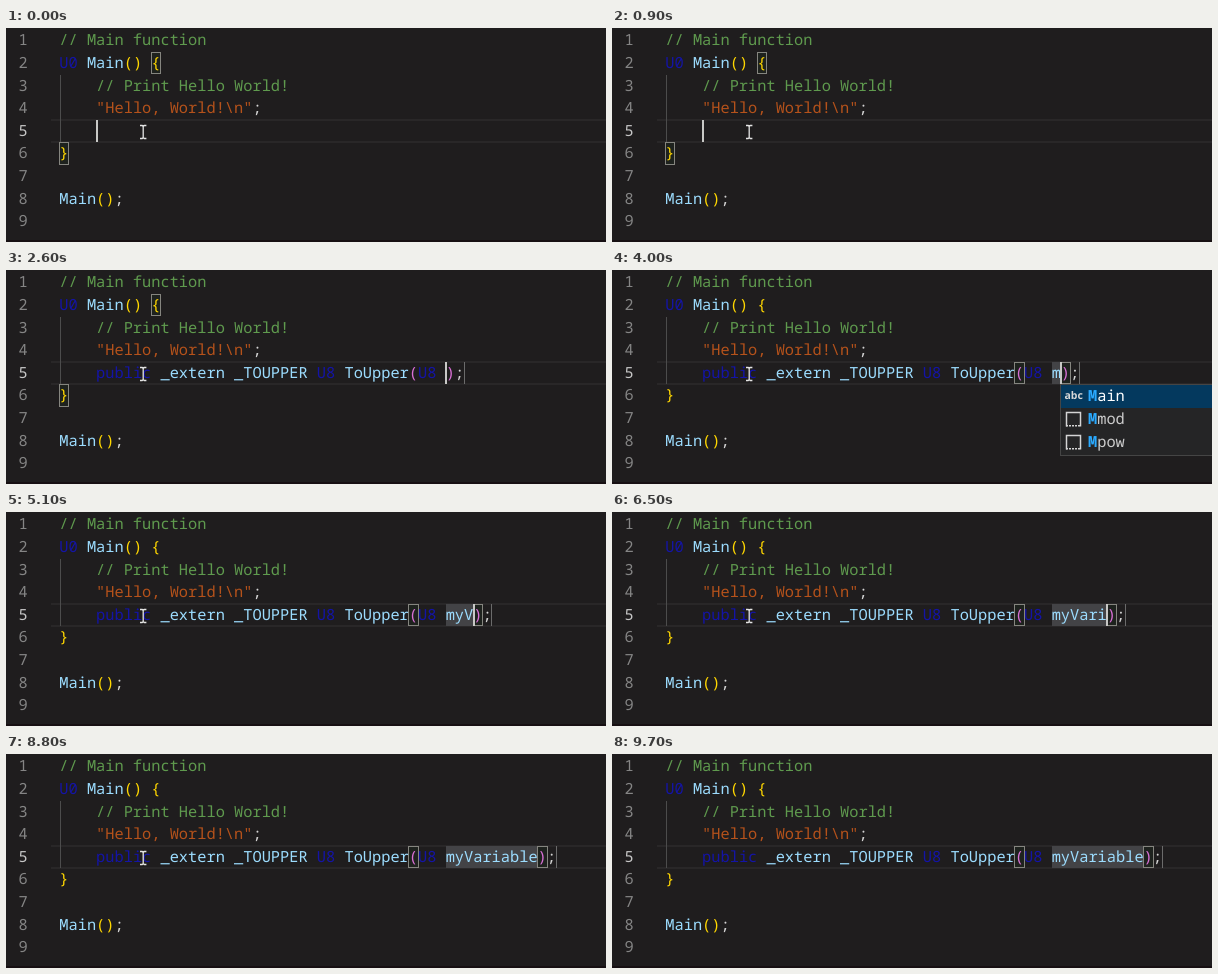
An HTML page for the animation above (9800 ms loop, 600 by 214 pixels).

```html
<!DOCTYPE html>
<html lang="en">
<head>
<meta charset="utf-8">
<title>Snippet completion</title>
<style>
html, body { margin: 0; width: 100%; height: 100%; overflow: hidden; background: #1f1d1e; }
#stage {
  position: relative; width: 600px; height: 214px; overflow: hidden;
  background: #1f1d1e; color: #d4d4d4;
  font: 500 15.333px "Noto Sans Mono", "DejaVu Sans Mono", monospace;
  text-rendering: geometricPrecision; font-variant-ligatures: none;
}
#stage div, #stage svg { position: absolute; white-space: pre; }
.line { line-height: 22.65px; height: 22.65px; }
.num { color: #858585; font-weight: 400; }
.num.on { color: #c6c6c6; }
.com { color: #5f9a4e; }
.str { color: #b5521b; }
.key { color: #1414a6; }
.id { color: #9cdcfe; }
.b1 { color: #ffd700; }
.b2 { color: #da70d6; }
.box { width: 8.5px; height: 20.5px; border: 1px solid #85857f; background: #1e221e; }
#current { left: 45px; top: 91px; width: 555px; height: 20px; border: 2px solid #292728; border-right: 0; border-left: 0; }
#guide { left: 54px; top: 47px; width: 1px; height: 67px; background: #4c4c4c; }
#word { top: 92px; height: 22px; background: #434346; }
#end { top: 92px; width: 1px; height: 22px; background: #6b6b6b; }
#caret { top: 92px; width: 2px; height: 22px; background: #c8c8c6; }
#mouse { left: 133px; top: 96px; }
#floor { left: 0; top: 212px; width: 600px; height: 2px; background: #171013; }
.menu { top: 114px; width: 520px; background: #252526; border: 1px solid #454545; }
.row { left: 0; width: 520px; height: 22.8px; line-height: 23.4px; color: #cccccc; }
.row.sel { background: #04395e; color: #ffffff; }
.row b { color: #2aaaff; font-weight: 700; }
.row .label { left: 26.6px; }
.row .note { font-size: 12.7px; line-height: 22px; color: #a8a8a8; }
.row.sel .note { color: #c3cdd5; }
.row .abc { left: 3px; font: 700 10.5px/22px "Open Sans", sans-serif; color: #d8d8d8; }
.row svg { left: 4px; top: 3px; }
</style>
</head>
<body>
<div id="stage"></div>
<script>
const LOOP = 9800, X0 = 53.3, W = 9.2, H = 22.65;
const stage = document.getElementById('stage');
const colX = c => X0 + c * W;
const lineY = n => 1.2 + (n - 1) * H;

function add(cls, x, y, html = '', parent = stage) {
  const el = document.createElement('div');
  el.className = cls;
  if (x !== null) el.style.left = x + 'px';
  if (y !== null) el.style.top = y + 'px';
  el.innerHTML = html;
  parent.append(el);
  return el;
}
function part(id, html) {
  const el = add('', null, null, html);
  el.id = id;
  return el;
}
const show = (el, on) => { el.style.visibility = on ? 'visible' : 'hidden'; };
const s = (cls, text) => `<span class="${cls}">${text}</span>`;

part('current');
part('guide');
const word = part('word');
const box = (col, n) => add('box', colX(col) - 0.6, lineY(n));
const braces = [box(10, 2), box(0, 6)];
const parens = [box(38, 5), box(52, 5)];

const code = [
  s('com', '// Main function'),
  s('key', 'U0') + ' ' + s('id', 'Main') + s('b1', '() {'),
  s('com', '    // Print Hello World!'),
  '    ' + s('str', '"Hello, World!\\n"') + ';',
  '',
  s('b1', '}'),
  '',
  s('id', 'Main') + s('b1', '()') + ';',
  ''
];
const lines = code.map((html, i) => {
  add('line num' + (i === 4 ? ' on' : ''), 12.6, lineY(i + 1), i + 1);
  return add('line', X0, lineY(i + 1), html);
});
const end = part('end');
const caret = part('caret');

// Completion menus
const snippetIcon = `<svg width="17" height="17" fill="none" stroke="#d4d4d4" stroke-width="1.5">
  <path d="M1.5 15.5V1.5H15.5V15.5"/><path d="M1 14.8H16" stroke-dasharray="2 1"/></svg>`;

function menu(items) {
  const el = add('menu', 0, null);
  el.style.height = items.length * 22.8 + 2 + 'px';
  const rows = items.map(([name, note, abc], i) => {
    const row = add('row', null, i * 22.8,
      abc ? '<div class="abc">abc</div>' : snippetIcon, el);
    const label = add('label', null, null, '', row);
    if (note) add('note', 384.3, 0, note, row);
    return { row, label, name };
  });
  return (col, typed, sel) => {
    show(el, typed > 0);
    el.style.left = colX(col) - 0.5 + 'px';
    rows.forEach(({ row, label, name }, i) => {
      row.classList.toggle('sel', i === sel);
      label.innerHTML = `<b>${name.slice(0, typed)}</b>${name.slice(typed)}`;
    });
  };
}
const caseMenu = menu([['toLowerS', 'To Lower String'], ['toUpperS', 'To Upper String']]);
const nameMenu = menu([['Main', '', true], ['Mmod'], ['Mpow']]);

part('floor');
const mouse = part('mouse', `<svg width="9" height="16" fill="none" stroke="#e4e4e4" stroke-width="1.3">
  <path d="M1 1.5H3.2L4.2 2.5L5.2 1.5H7.4M4.2 2.5V13.5M1 14.5H3.2L4.2 13.5L5.2 14.5H7.4"/></svg>`);

// Typing schedule
const PREFIX = 'to', NAME = 'myVariable';
const T_KEYS = [1400, 1800], T_DOWN = 2200, T_PICK = 2500, T_MATCH = 2700;
const T_NAME = 3900, STEP = 4200 / 9;
const nameKeys = [...NAME].map((_, i) => T_NAME + i * STEP - 1);
const keys = [-200, ...T_KEYS, T_DOWN, T_PICK, ...nameKeys];

function lineFive(picked, text) {
  if (!picked) return '    ' + s('id', text);
  return '    ' + s('key', 'public') + s('id', ' _extern _TOUPPER ') + s('key', 'U8') +
    s('id', ' ToUpper') + s('b2', '(') + s('key', 'U8') + ' ' + s('id', text) + s('b2', ')') + ';';
}

let last = '';
function render(t) {
  const past = list => list.filter(k => k <= t).length;
  const picked = t >= T_PICK;
  const n = past(picked ? nameKeys : T_KEYS);
  const text = (picked ? NAME : PREFIX).slice(0, n);
  const col = (picked ? 42 : 4) + n;

  const html = lineFive(picked, text);
  if (html !== last) lines[4].innerHTML = last = html;

  const idle = t - keys[past(keys) - 1];
  show(caret, idle % 1000 < 500);
  caret.style.left = colX(col) - 0.5 + 'px';

  show(end, picked);
  end.style.left = colX(col + 2) - 0.5 + 'px';
  show(word, picked && n > 0);
  word.style.left = colX(42) + 'px';
  word.style.width = n * W + 'px';

  const matched = t >= T_MATCH;
  braces.forEach(b => show(b, !matched));
  parens.forEach(b => show(b, matched));
  parens[1].style.left = colX(col) - 0.6 + 'px';

  caseMenu(col, picked ? 0 : n, t < T_DOWN ? 0 : 1);
  nameMenu(col, picked && n === 1 ? 1 : 0, 0);
  show(mouse, t < 9700);
}

function tick() {
  render(performance.now() % LOOP);
  requestAnimationFrame(tick);
}
tick();
</script>
</body>
</html>
```
